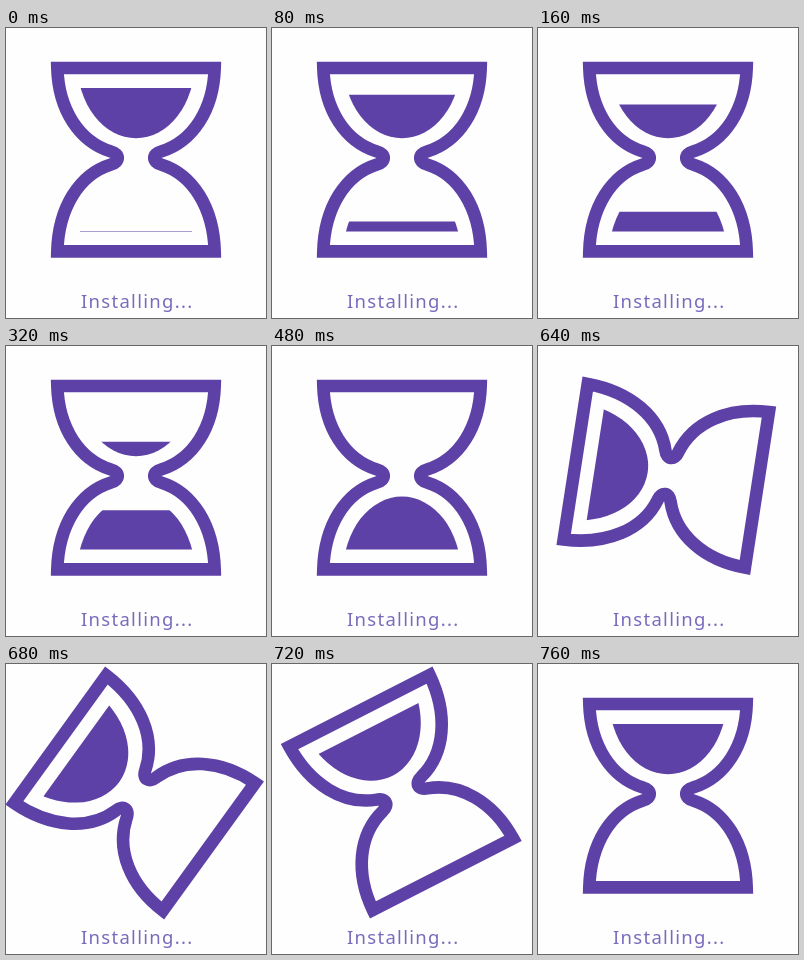
An HTML page with a canvas that plays this animation: 260x290 px, repeating every 800 ms.

```html
<!DOCTYPE html>
<html lang="en">
<head>
<meta charset="utf-8">
<title>Installing</title>
<style>
  html, body { margin: 0; width: 260px; height: 290px; overflow: hidden; background: #fefefe; }
  canvas { display: block; }
</style>
</head>
<body>
<canvas id="stage" width="260" height="290"></canvas>
<script>
const ctx = document.getElementById('stage').getContext('2d');
const LOOP = 800, STEP = 40, LAST = LOOP / STEP - 1;
const POUR_END = 0.65; // share of the loop spent pouring; the rest is the flip
const PURPLE = '#5d41a6';

// Glass outline around the pivot in its neck; the lower bulb is slightly taller
const glass = new Path2D(
  'M-78.7-90H78.7C77.5-48.5 57-16.5 25-6.5C16-4 16 4 25 6.5C57 16.5 77.5 50 78.7 93.4' +
  'H-78.7C-77.5 50-57 16.5-25 6.5C-16 4-16-4-25-6.5C-57-16.5-77.5-48.5-78.7-90Z');

// Sand in the bowl whose ellipse is centred at bowlY, cut to a band of heights
function sand(bowlY, from, to) {
  if (to <= from) return;
  ctx.save();
  ctx.beginPath();
  ctx.rect(-60, from, 120, to - from);
  ctx.clip();
  ctx.beginPath();
  ctx.ellipse(0, bowlY, 58.8, 76, 0, 0, 2 * Math.PI);
  ctx.fill();
  ctx.restore();
}

function draw(ms) {
  const p = Math.floor((ms % LOOP) / STEP) / LAST;
  const turned = p === 1; // a finished flip is the upright, freshly filled glass
  const pour = turned ? 0 : Math.min(1, p / POUR_END);
  const flip = turned ? 0 : Math.max(0, (p - POUR_END) / (1 - POUR_END));

  ctx.fillStyle = '#fefefe';
  ctx.fillRect(0, 0, 260, 290);

  ctx.save();
  ctx.translate(130, 130);
  ctx.rotate(flip * Math.PI);
  ctx.strokeStyle = ctx.fillStyle = PURPLE;
  ctx.lineWidth = 12.6;
  ctx.stroke(glass);
  sand(-95.8, Math.max(-70, -73 + 60 * pour), -19);
  if (!turned) sand(96.6, 73.1 - 60 * pour, 73.6);
  ctx.restore();

  ctx.fillStyle = '#7a6abc';
  ctx.font = '18.5px "Noto Sans", sans-serif';
  ctx.letterSpacing = '1.3px';
  ctx.fillText('Installing...', 75, 280);
}

function tick() {
  draw(performance.now());
  requestAnimationFrame(tick);
}
tick();
</script>
</body>
</html>
```
